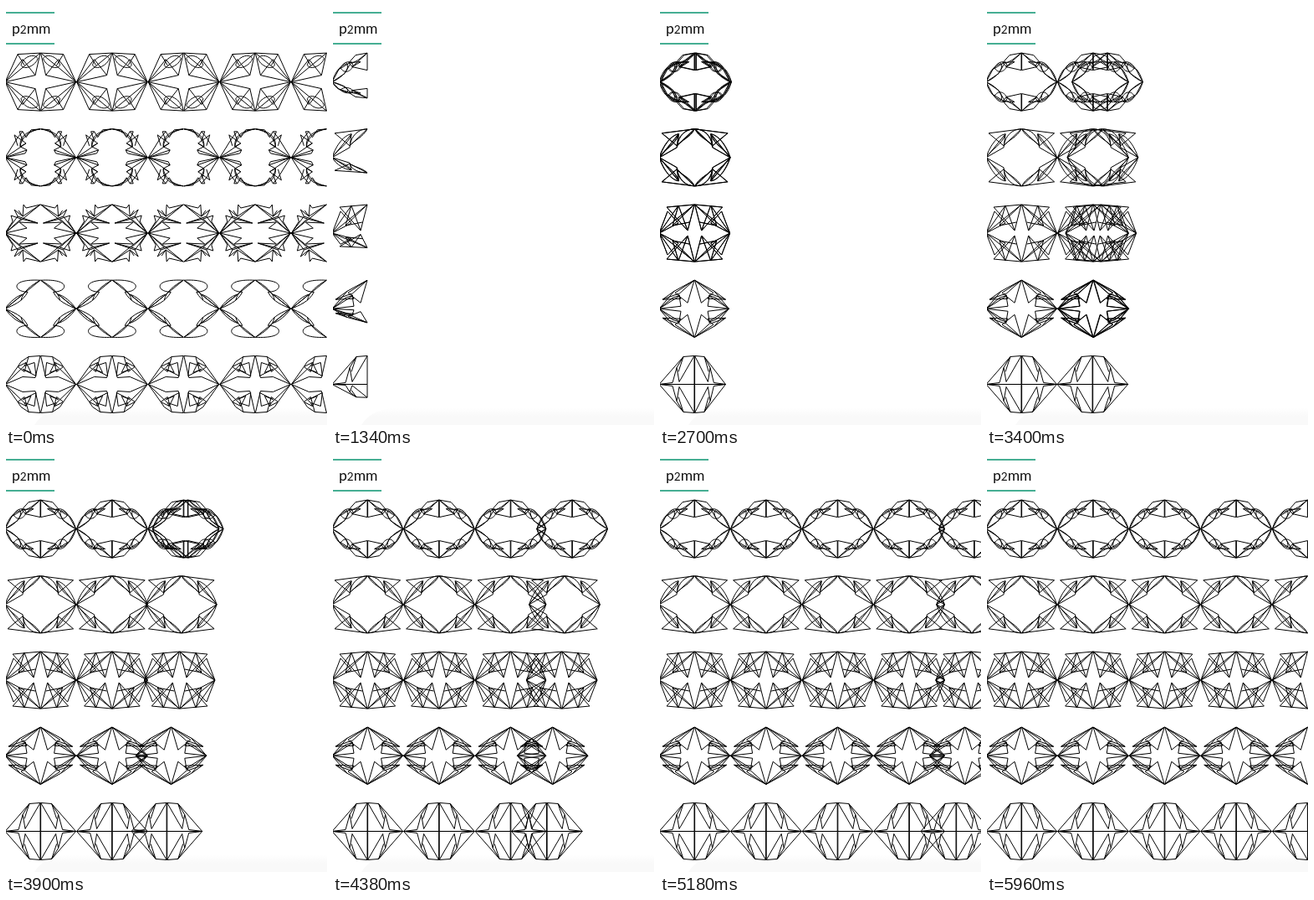
An HTML page with a canvas that plays this animation: 384x500 px, repeating every 5980 ms.

```html
<!DOCTYPE html>
<html>
<head>
<meta charset="utf-8">
<style>
html, body { margin: 0; width: 100%; height: 100%; overflow: hidden; background: #fff; }
canvas { position: absolute; left: 0; top: 0; }
#label {
  position: absolute; left: 0; top: 7px; width: 51px; height: 35px; padding-left: 7px;
  border: solid #46ae93; border-width: 2px 0;
  font: 17.5px/35px Lato, sans-serif; color: #111;
}
#label span { font-size: 13.5px; }
</style>
</head>
<body>
<canvas id="stage" width="384" height="500"></canvas>
<div id="label">p<span>2</span>mm</div>
<script>
const LOOP = 5980, PERIOD = 85.6, AXIS = 41.3;
const ctx = document.getElementById('stage').getContext('2d');
const label = document.getElementById('label');

// Upper left quarter of each motif; y is measured from the row's middle.
const oldCells = [
  'M-1 0L14-33 41-34.5 35-8-1 0 41-34.5M-1 0L20-27 35-8M14-33L22-20M18-20C20-30 34-35 38-28 36-20 22-13 18-20',
  'M-1 0L24-17 17-13 25-9-1 0 14-24 24-17M-1 0L23-5 25-9M14-24L20-31 24-24 30-33 41-34C28-32 18-24 17-13 16-26 26-32 41-34M14-24L10-27 14-14M20-31L16-31 20-20',
  'M-1 0L41-34 24-30 21-34 20-20 41-34M-1 0L14-20 10-28 20-20 15-27M-1 0L8-14 6-21 18-17M14-20L38-12 18-17-1 0 25-6 16-13 38-12',
  'M41-34C24-35 12-32 13-26 14-22 20-20 26-20M-1 0L41-34M-1 0C8-4 20-8 26-20M-1 0C4-8 14-16 20-17L-1 0M41-34C30-28 20-20 18-10',
  'M41-34L35-8 20-9-1 0 22-22M-1 0L14-21 18-27 27-33 41-34M14-21L22-15 27-33M22-22L34-26 36-10 20-18 30-14 24-26ZM14-21L24-26'
].map(d => new Path2D(d));
const cells = [
  'M41-34.5V-14L23-18 41-34.5 27-32 19-23 24-17M41-34.5L30-26 22-22M-1 0L7-15 22-24 14-10ZM-1 0C3-14 10-20 17-22 20-14 10-5-1 0M9-17C13-25 22-26 24-20 22-12 13-9 9-17M19-23L33-24 23-18',
  'M41-34L2-29 20-14M-1 0L22-28 20-12ZM-1 0C5-10 18-15 22-28 14-27 4-16-1 0M20-14C24-20 36-24 41-34 30-34 22-26 20-14L41-34',
  'M-1 0L22-33 15-9 41-34 33-3 8-31 41-34M22-33L33-3M-1 0L9-26 22-12ZM-1 0L41-34M15-9L35-13',
  'M41-34L33-7 18-19 41-34 22-17 25-12 3-11 17-21 41-34M-1 0L25-3 23-15ZM-1 0L17-21M-1 0L15-13 24-16M3-11L22-18',
  'M-1 0L28-33 41-34V0M-1 0L15-2 20-20 28-33M20-20L23-3 41-34M22-15L28-33M-1 0H41'
].map(d => new Path2D(d));

// Start times per row: mirror down, mirror right, then each sliding copy.
const starts = [
  [570, 1700, 2688, 3285, 3865, 4635, 5270],
  [573, 1700, 2697, 3320, 3920, 4645, 5310],
  [576, 1705, 2700, 3335, 3935, 4641, 5330],
  [580, 1715, 2715, 3397, 4008, 4686, 5380],
  [585, 1730, 2764, 3405, 4053, 4755, 5420]
];

function progress(row, step, t) {
  const s = starts[row], next = s[step + 1] || Infinity;
  const span = step < 2 ? 990 + 11 * row : 600 + 12 * row;
  return Math.max(0, Math.min(1, (t - s[step]) / Math.min(span, next - s[step])));
}

function place(path, cell, sx, sy, dx) {
  path.addPath(cell, new DOMMatrix([sx, 0, 0, sy, AXIS * (1 - sx) + dx, 0]));
}

function drawRow(cell, row, t) {
  const sy = 1 - 2 * progress(row, 0, t), sx = 1 - 2 * progress(row, 1, t);
  ctx.save();
  ctx.translate(0, 90.6 + 90.22 * row);
  const drawUnit = dx => {
    const path = new Path2D();
    for (const x of sx < 1 ? [1, sx] : [1])
      for (const y of sy < 1 ? [1, sy] : [1]) place(path, cell, x, y, dx);
    ctx.stroke(path);
  };
  drawUnit(0);
  for (let k = 0; k < 5; k++) {
    const p = progress(row, k + 2, t);
    if (p > 0) drawUnit((k + p) * PERIOD);
  }
  ctx.restore();
}

function drawFloor() {
  const g = ctx.createLinearGradient(0, 479, 0, 490);
  g.addColorStop(0, '#fff');
  g.addColorStop(1, '#f9f9f9');
  ctx.fillStyle = g;
  ctx.beginPath();
  ctx.moveTo(34, 500);
  ctx.quadraticCurveTo(46, 480, 80, 479);
  ctx.lineTo(384, 479);
  ctx.lineTo(384, 500);
  ctx.fill();
}

function frame(now) {
  const t = now % LOOP;
  const alpha = t < 100 ? Math.min(1, 1 - (t - 20) / 80) : t < 560 ? 0 : 1;
  ctx.clearRect(0, 0, 384, 500);
  drawFloor();
  label.style.opacity = alpha;
  ctx.globalAlpha = alpha;
  ctx.lineWidth = 1;
  ctx.strokeStyle = '#000';
  if (alpha > 0) {
    const old = t < 560;
    (old ? oldCells : cells).forEach((cell, i) => drawRow(cell, i, old ? LOOP : t));
  }
  ctx.globalAlpha = 1;
  requestAnimationFrame(frame);
}
requestAnimationFrame(frame);
</script>
</body>
</html>
```
